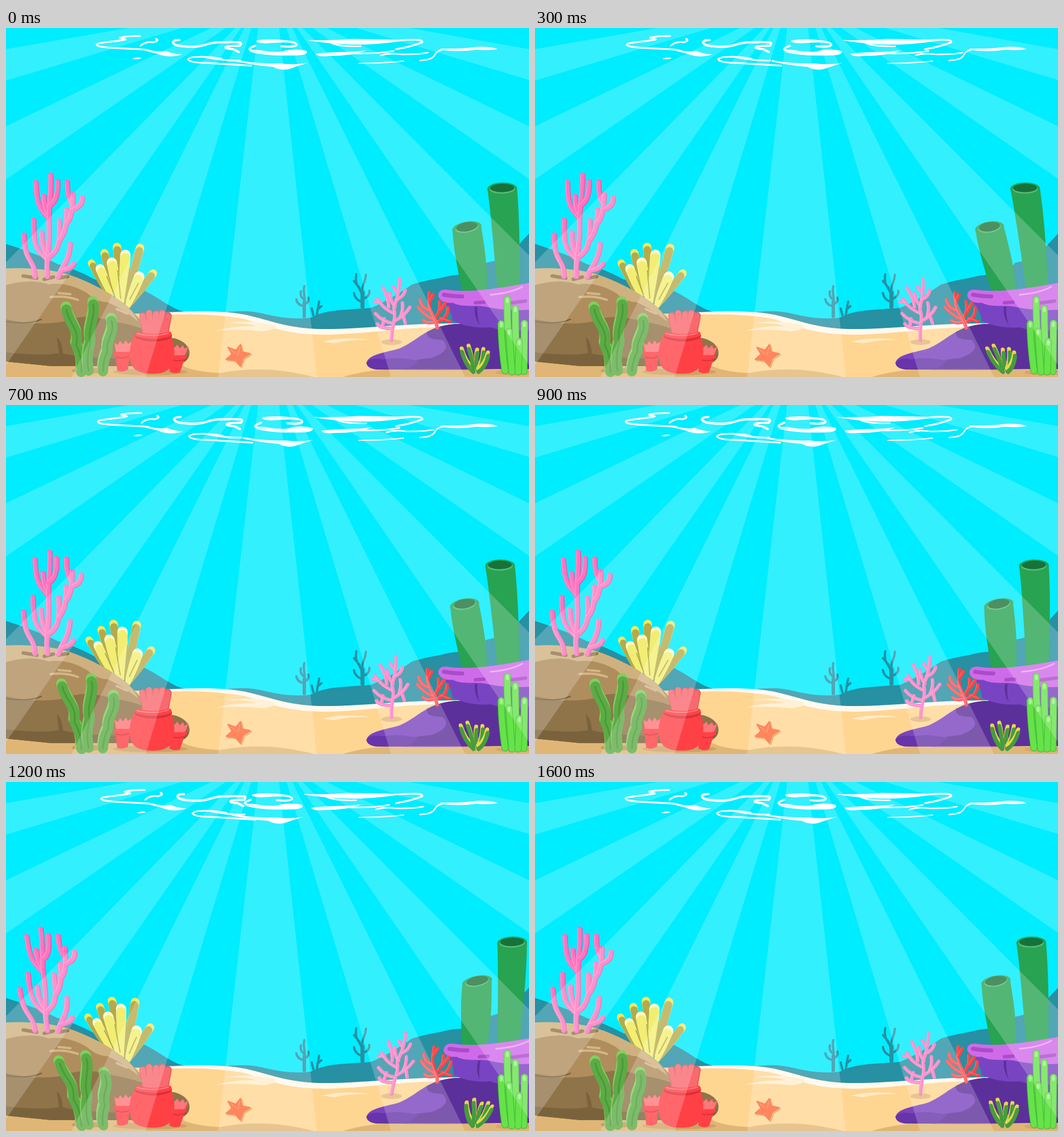
An HTML page with a canvas that plays this animation: 917x611 px, repeating every 1.7 s.

```html
<!DOCTYPE html>
<html lang="en">
<head>
<meta charset="utf-8">
<title>Reef</title>
<style>
html, body { margin: 0; width: 100%; height: 100%; overflow: hidden; background: #00ecff; }
canvas { display: block; }
</style>
</head>
<body>
<canvas width="917" height="611"></canvas>
<script>
const ctx = document.querySelector('canvas').getContext('2d');
ctx.lineCap = ctx.lineJoin = 'round';

// Horizontal drift of each part's top, at these 100 ms steps.
const KEYS = [0, 3, 7, 9, 12, 14, 16];
const SWAY = {
  tube: [0, -11, -4, 5, 18, 11, 0],
  ledge: [0, 0, 0, 4, 10, 7, 0],
  bigCoral: [0, 5, -2, -3, -18, -9, 0],
  yellow: [0, 2, -6, 3, -9, -2, 0],
  pink: [0, -10, -6, 3, 11, 6, 0],
  red: [0, -6, -3, 2, 9, 6, 0],
  sprout: [0, -7, -2, 3, 10, 6, 0],
  weedA: [0, -2, -8, 0, -13, -7, 0],
  weedB: [0, 0, -3, 1, -13, -4, 0],
  weedC: [0, 5, 4, 1, -13, -6, 0],
  waterMid: [0, 10, 10, 0, -8, 0, 0],
  waterLeft: [0, 2, 2, 0, 8, 0, 0]
};
let step = 0;

function drift(name, held) {
  let i = 0;
  while (i < KEYS.length - 2 && step >= KEYS[i + 1]) i++;
  let f = (step - KEYS[i]) / (KEYS[i + 1] - KEYS[i]);
  if (held) f = Math.round(f);
  const v = SWAY[name];
  return v[i] + (v[i + 1] - v[i]) * f;
}

const cache = {};
const path = d => cache[d] ||= new Path2D(d);
function fill(color, d) { ctx.fillStyle = color; ctx.fill(path(d)); }
function line(color, width, d) {
  ctx.strokeStyle = color;
  ctx.lineWidth = width;
  ctx.stroke(path(d));
}
function oval(color, x, y, rx, ry, turn = 0) {
  ctx.fillStyle = color;
  ctx.beginPath();
  ctx.ellipse(x, y, rx, ry, turn, 0, 7);
  ctx.fill();
}
function shifted(dx, dy, draw) {
  ctx.save();
  ctx.translate(dx, dy);
  draw();
  ctx.restore();
}
// Lean a part about its base so that its top moves by the drift.
function lean(name, base, height, draw) {
  const k = drift(name) / height;
  ctx.save();
  ctx.transform(1, 0, -k, 1, k * base, 0);
  draw();
  ctx.restore();
}
// A round-tipped finger that narrows towards its base.
function finger(color, cap, x, y, baseX, baseY, width) {
  const length = Math.hypot(baseX - x, baseY - y), r = width / 2;
  ctx.save();
  ctx.translate(x, y);
  ctx.rotate(Math.atan2(x - baseX, baseY - y));
  for (const [tone, inset, top] of [[cap, 0, 0], [color, .5, 6]]) {
    ctx.fillStyle = tone;
    ctx.beginPath();
    ctx.ellipse(0, r + top, r - inset, r, 0, Math.PI, 0);
    ctx.quadraticCurveTo(r, length * .6, r * .4, length);
    ctx.lineTo(-r * .4, length);
    ctx.quadraticCurveTo(-r, length * .6, -r + inset, r + top);
    ctx.fill();
  }
  ctx.restore();
}

function backdrop() {
  ctx.fillStyle = '#00ecff';
  ctx.fillRect(0, 0, 917, 611);
  const hill = '#2790a2';
  fill(hill, 'M0 378C30 388 60 398 90 413C125 424 140 432 155 440L235 457C265 468 285 490 313 497L280 520H0Z');
  fill(hill, 'M375 499C410 494 430 495 455 501Q500 512 535 507C560 493 590 494 640 490C665 480 690 464 712 449Q735 442 760 438Q785 431 800 432Q830 428 842 411Q875 405 890 389L917 360V540H560Z');
  line(hill, 6, 'M523 505V480');
  line(hill, 4, 'M523 485C526 472 520 464 523 452M522 487Q511 485 509 475M522 475Q515 470 517 461M525 483Q532 480 530 472M545 502L549 479M546 493L553 487M539 503L536 491');
  line(hill, 7, 'M625 488V463');
  line(hill, 4, 'M625 470C622 452 611 455 614 431M625 468C622 448 630 450 631 432M625 480Q612 476 610 464M627 474Q638 470 637 460M620 455L610 443');
}

function sand() {
  fill('#ffd592', 'M0 500H290Q350 494 400 500C450 505 480 524 545 527C620 529 690 519 800 519H917V611H0Z');
  fill('#fff9ed', 'M278 498C350 494 390 496 420 502C465 512 490 526 550 527C620 528 690 517 800 517L770 524C690 524 640 535 565 537C490 537 465 523 420 510Q365 499 280 502Z');
  fill('#ffedcc', 'M368 530Q400 521 439 522Q420 516 385 517Q425 510 470 520Q480 527 450 531Q410 526 368 530Z');
  fill('#ffebc9', 'M555 549Q590 540 640 546Q600 545 575 552Z');
  fill('#e0b676', 'M0 585H300Q320 602 375 604C430 594 480 596 540 611H0Z');
  fill('#e0b676', 'M590 611Q640 596 700 597H917V611Z');
  oval('#e1b878', 676, 550, 18, 5);
}

function yellowCoral() {
  const olive = '#b5aa4b', bright = '#f2ee74', pale = '#fffbc8';
  lean('yellow', 485, 105, () => {
    finger(olive, '#f0e760', 147, 406, 180, 470, 13);
    finger(olive, '#f0e760', 171, 387, 190, 470, 14);
    finger(olive, '#f0e760', 194, 376, 202, 475, 15);
    finger(olive, '#f0e760', 237, 378, 210, 480, 15);
    finger(olive, '#f0e760', 262, 424, 213, 490, 14);
    finger(bright, pale, 162, 414, 186, 472, 16);
    finger(bright, pale, 184, 402, 198, 478, 18);
    finger(bright, pale, 210, 388, 204, 482, 18);
    finger(bright, pale, 237, 427, 211, 492, 18);
    line(olive, 2, 'M177 435L190 467M196 425L201 473M217 420L208 480M232 447L217 475');
  });
}

function rock() {
  fill('#b08d5d', 'M0 421Q75 418 122 436C152 448 176 460 196 475C228 494 244 530 276 542C306 540 326 557 321 574C317 590 294 592 260 592H80L0 584Z');
  fill('#cfb180', 'M0 421Q75 418 122 436C152 448 176 460 196 475Q222 492 232 514Q205 492 178 480Q160 480 142 464C120 451 96 445 75 449Q45 438 0 450Z');
  fill('#8f7449', 'M0 510Q60 523 105 513C140 498 170 510 200 516Q235 522 276 542C306 540 326 557 321 574C317 590 294 592 260 592H80L0 584Z');
  fill('#7a633c', 'M0 568Q70 575 93 569L89 542Q97 545 100 570Q180 586 320 572C317 590 294 592 260 592H80L0 584Z');
  line('#d2b787', 4, 'M78 471Q105 468 126 476M92 464L113 466M194 492L212 500');
  line('#745d38', 2, 'M0 514Q40 520 62 510');
  line('#8f7348', 6, 'M30 434L54 438M67 440L83 436M92 438L108 435');
}

function bigCoral() {
  const d = 'M72 435C68 405 77 385 75 350S79 300 78 257M74 333C62 318 53 315 52 270M75 330Q66 315 66 294M78 309Q91 300 90 268' +
    'M50 435C50 403 32 413 31 362M73 406C56 390 47 388 48 336M73 400Q61 382 62 358' +
    'M91 436C96 417 110 410 112 378M97 424Q114 421 118 412M75 400C94 390 94 365 93 337M93 371Q107 355 106 318' +
    'M106 341Q116 333 117 291M117 317Q133 312 133 297M117 311Q106 295 107 269';
  lean('bigCoral', 437, 185, () => {
    shifted(1.5, 1, () => line('#e65aa7', 8, d));
    line('#ff74bf', 8, d);
    shifted(-2.5, -1, () => line('#ff96cf', 1.5, d));
  });
}

function seaweed() {
  const weeds = [
    ['weedA', 'M105 488C108 512 129 522 122 550Q134 574 131 597', 120],
    ['weedB', 'M152 479C157 499 141 521 147 545Q139 573 144 595', 125],
    ['weedC', 'M184 508C191 529 173 541 177 561Q169 577 169 596', 95]
  ];
  oval('#c19a62', 147, 600, 32, 5);
  for (const [name, d, height] of weeds) lean(name, 600, height, () => {
    line('#7fd05f', 19, d);
    shifted(1, 5, () => {
      line('#5cab45', 18, d);
      line('#4b9a3a', 3, d);
    });
  });
}

function vase() {
  const red = '#ff4146', dark = '#da3039', soft = '#ff777a';
  const pot = 'M190 551l6 4 4-7 5 6 5-7 4 6 6-4-3 20-3 29Q204 604 195 600L192 574Z';
  const smallPot = () => {
    fill(red, pot);
    fill(soft, 'M190 551l6 4 4-7 5 6 5-7 4 6 6-4-3 18H193Z');
    line(dark, 2, 'M193 576Q205 580 215 575');
    line(red, 7, 'M192 570Q204 574 216 570');
  };
  oval('#cda268', 253, 602, 65, 6);
  line('#df555a', 13, 'M240 504L246 537M251 500L253 536M264 501L260 537M274 500L269 537M284 504L278 537');
  line('#f9696f', 10, 'M239 504L246 537M251 499L253 536M263 501L260 537M274 500L269 537M284 504L278 537');
  smallPot();
  ctx.save();
  ctx.transform(-1, 0, -.2, .92, 620, 51);
  smallPot();
  ctx.restore();
  fill(red, 'M224 539Q214 560 218 584Q223 605 254 605Q290 607 293 581Q299 558 288 538Z');
  line(dark, 10, 'M231 539Q260 549 286 539');
  line(red, 9, 'M231 536Q260 544 286 536');
  line(soft, 2, 'M230 535Q260 542 285 534');
}

function starfish() {
  const d = 'M411 554L414 567L428 570L416 578L411 592L402 582L386 580L396 571L389 559L403 564Z';
  shifted(2, 2, () => { fill('#e4bc80', d); line('#e4bc80', 3, d); });
  fill('#ff865e', d);
  line('#ff865e', 2, d);
  line('#ffa27f', 1.5, 'M407 572L410 559M404 571L394 563');
}

function tubes() {
  lean('tube', 460, 110, () => {
    fill('#28a352', 'M783 354Q784 390 801 465H843Q846 420 833 347Z');
    oval('#28a352', 808, 350, 26, 11, -.17);
    oval('#56bd79', 808, 350, 20, 8, -.17);
    oval('#1e733c', 808, 348, 19, 8, -.17);
  });
  lean('tube', 460, 185, () => {
    fill('#28a352', 'M844 282Q849 310 862 465H900Q902 350 896 281Z');
    oval('#28a352', 870, 281, 26, 10.5, -.02);
    oval('#56bd79', 870, 282, 22, 8, -.02);
    oval('#16723a', 870, 280, 21, 7.5, -.02);
  });
}

function purpleRock() {
  fill('#7a43bf', 'M632 586C637 570 668 568 690 561C725 546 736 522 788 518H917V597H860Q750 600 650 597Q633 596 632 586Z');
  fill('#5c309a', 'M705 597Q700 580 745 578Q785 564 765 546Q735 546 738 532Q760 520 788 518H917V597Z');
  fill('#6734a9', 'M632 586Q640 576 660 580Q690 575 723 583L704 598H650Q633 596 632 586Z');
  lean('ledge', 520, 55, () => {
    fill('#7944c2', 'M763 476Q781 491 783 513Q815 527 850 524Q890 538 960 520V470Z');
    fill('#5c309a', 'M826 488Q826 509 831 521Q820 506 822 488Z');
    fill('#cf6be9', 'M758 470Q757 457 772 458C812 464 860 458 960 438V487Q900 500 846 489C824 483 804 491 783 481Q764 483 758 470Z');
    line('#a94cc8', 7, 'M768 467Q785 470 800 470');
    line('#a94cc8', 6, 'M823 481L838 480M880 482L911 478');
    line('#e9a2f5', 3, 'M850 467Q885 464 905 453');
  });
}

function rightPlants() {
  const pink = 'M676 547C676 520 685 510 680 490Q690 464 690 440M677 526Q657 527 651 518M678 517Q660 514 648 500M681 500Q660 491 652 474M671 488Q671 474 661 455M682 488Q674 478 673 464M682 513Q700 503 708 489M696 501L700 517M691 507Q697 493 695 481M684 476Q698 470 700 459M663 509L660 522M657 480L646 480M686 463L679 453';
  lean('pink', 550, 110, () => {
    line('#ff74bf', 6, pink);
    shifted(-1.5, 0, () => line('#ff9bd1', 1, pink));
  });
  const red = 'M756 525C753 502 738 503 742 463M752 511Q735 505 723 489M745 495Q729 492 726 476M753 514Q740 519 732 512M754 506Q763 492 760 479M757 514Q774 509 775 490M762 508L778 514M761 496L770 482M742 480L749 467';
  lean('red', 527, 65, () => {
    line('#f9454a', 6, red);
    shifted(-1.5, -1, () => line('#ff7574', 1, red));
  });
  lean('sprout', 598, 43, () => {
    for (const tip of ['799 561Q805 584', '811 556Q818 577', '826 563Q822 580', '837 562Q835 583', '845 568Q840 588']) {
      const d = 'M' + tip + ' ' + (tip < '82' ? 819 : 828) + ' 596';
      line('#e8d54e', 7, d);
      shifted(.5, 6, () => line('#459c3d', 7, d));
    }
  });
  oval('#d4a86d', 893, 603, 35, 5);
  const blades = ['M879 475Q878 525 886 599', 'M893 491Q893 540 896 599', 'M909 517L908 601', 'M868 518Q869 560 875 600', 'M882 531L887 602', 'M900 549L898 602'];
  for (const d of blades) {
    line('#42b83d', 12.5, d);
    line('#66e348', 10.5, d);
    line('#a2f18a', 5, d.split(/[QL]/)[0] + 'l0 4');
  }
}

// Light wedges: both sides run from the top of the stage to its other edges.
const RAYS = [
  '442 0L372 611L545 611L479 0', '430 0L245 611L115 611L418 0', '412 0L0 590V410L402 0',
  '385 0L0 265V172L360 0', '308 0L0 92V37L215 0',
  '492 0L675 611L805 611L502 0', '510 0L917 590V398L520 0',
  '537 0L917 264V172L562 0', '614 0L917 91V37L707 0'
].map(d => 'M' + d + 'Z').join('');

function water() {
  const white = '#fff';
  shifted(drift('waterLeft', true), 0, () => {
    line(white, 3, 'M235 14Q210 14 200 17L210 20C190 25 145 25 163 32C190 37 220 35 244 38Q261 43 275 45M236 31Q245 23 258 25Q270 22 263 19');
    fill(white, 'M244 36Q263 43 280 40Q295 46 309 46Q288 53 270 47Z');
    fill(white, 'M221 54Q230 50 238 53Q230 56 221 54Z');
    line(white, 4, 'M304 21C287 21 289 31 312 32C349 36 349 25 374 25C416 24 414 25 410 31C378 31 380 36 398 37L408 42');
    line(white, 3, 'M378 54C350 49 322 49 319 55Q323 61 350 61L430 66M350 51Q385 58 410 57');
  });
  shifted(drift('waterMid', true), 0, () => {
    line(white, 3.5, 'M441 23C460 29 476 20 504 25C518 31 504 34 483 32M441 23Q470 19 504 25M437 31C421 37 425 40 442 40Q470 46 502 42');
    fill(white, 'M425 41Q475 46 491 39Q512 36 527 40Q532 47 509 48Q455 50 425 41Z');
    fill(white, 'M405 56Q440 63 480 62Q507 65 529 61Q510 67 496 72Q480 75 468 68Q440 66 405 59Z');
    fill(white, 'M531 21Q580 22 607 19Q665 20 705 21Q650 30 612 29Q575 29 531 22Z');
    fill(white, 'M543 45Q560 43 584 42Q615 42 632 39Q608 49 566 49Q546 51 543 45Z');
    line(white, 2.5, 'M570 26Q585 33 622 32M600 44Q650 46 680 40M657 48Q672 43 690 46Q718 47 740 43');
  });
  line(white, 3, 'M690 22Q732 18 730 25Q710 33 684 37');
  line(white, 2, 'M619 62Q655 62 697 58');
  line(white, 2.5, 'M726 57C762 54 744 44 764 38L783 37');
  fill(white, 'M762 36Q795 37 825 33Q850 32 862 37Q845 40 825 38Q790 43 762 38Z');
}

function rays() { fill('rgba(255,255,255,.2)', RAYS); }

const SCENE = [backdrop, sand, yellowCoral, rock, bigCoral, seaweed, vase, tubes, purpleRock, rightPlants, rays, starfish, water];

function frame() {
  step = Math.floor(performance.now() % 1700 / 100);
  for (const draw of SCENE) draw();
  requestAnimationFrame(frame);
}
frame();
</script>
</body>
</html>
```
